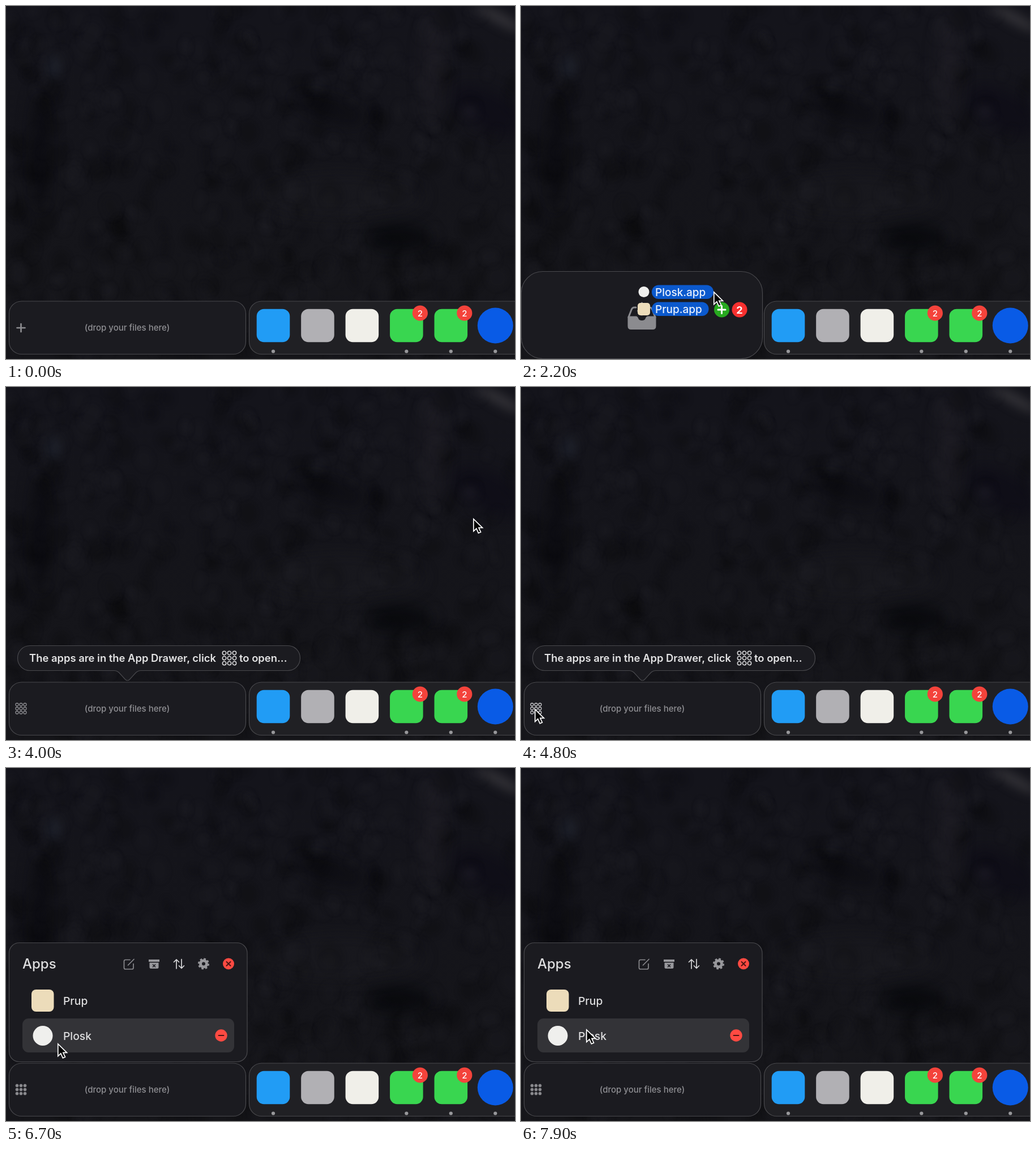
Animation, 899 px wide and 623 px high, one loop 8 s. Source, as an HTML page with a canvas:

```html
<!DOCTYPE html>
<html lang="en">
<head>
<meta charset="utf-8">
<title>App drawer</title>
<style>
  html, body { margin: 0; width: 100%; height: 100%; overflow: hidden; background: #14141a; }
  canvas, svg { position: absolute; inset: 0; width: 100%; height: 100%; display: block; }
  text { font-family: Inter, "Open Sans", sans-serif; font-weight: 500; fill: #dededf; }
  .panel { stroke: #49494d; stroke-width: 1.2; fill: #1b1b20; }
  .line { fill: none; stroke: #8b8b8f; stroke-linecap: round; stroke-linejoin: round; }
  .badge { font-size: 15px; fill: #fff; text-anchor: middle; }
  .file { font-size: 19px; fill: #e8f0fc; }
  .name { font-size: 19.3px; }
  .tip { font-size: 18.4px; font-weight: 600; fill: #e4e4e5; }
</style>
</head>
<body>
<canvas id="wall" width="899" height="623"></canvas>
<svg viewBox="0 0 899 623" preserveAspectRatio="none">
  <defs>
    <g id="dots">
      <circle cx="-7" cy="-7" r="2.5"/><circle cy="-7" r="2.5"/><circle cx="7" cy="-7" r="2.5"/>
      <circle cx="-7" r="2.5"/><circle r="2.5"/><circle cx="7" r="2.5"/>
      <circle cx="-7" cy="7" r="2.5"/><circle cy="7" r="2.5"/><circle cx="7" cy="7" r="2.5"/>
    </g>
  </defs>

  <rect class="panel" x="429.5" y="521" width="520" height="93.5" rx="22" style="fill:#202024"/>
  <g id="dock"></g>

  <rect id="shelf" class="panel"/>
  <g id="idle">
    <text x="214" y="573" text-anchor="middle" style="font-size:15px;fill:#8f8f93">(drop your files here)</text>
    <path id="plus" class="line" d="M19.5 568h14M26.5 561v14" stroke-width="2.7"/>
    <use id="grid" href="#dots" x="26.5" y="567.5"/>
  </g>

  <g id="tray" class="line" stroke-width="3">
    <path id="trayFill" d="M190 549h13q2 0 3 3.5 2 4 7.5 4t7.5-4q1-3.5 3-3.5h13v16q0 4.5-4.5 4.5h-38q-4.5 0-4.5-4.5z"/>
    <path d="M203 532h-3q-3 0-4.5 3l-5.5 14M224 532h3q3 0 4.5 3l5.5 14M213.5 524v20M206.5 538l7 7 7-7"/>
  </g>

  <g id="tooltip">
    <path class="panel" d="M42 456.5H498a21.5 22 0 0 1 0 44H238q-5 0-9 4l-11 12q-3.500 3-7 0l-11-12q-4-4-9-4H42a21.500 22 0 0 1 0-44z"/>
    <text class="tip" x="41" y="485">The apps are in the App Drawer, click</text>
    <use href="#dots" transform="translate(394.500 478.500) scale(1.28)" fill="none" stroke="#dcdcde" stroke-width="1.2"/>
    <text class="tip" x="412" y="485">to open...</text>
  </g>

  <g id="drawer">
    <rect class="panel" x="5.500" y="308.500" width="420.500" height="210" rx="18"/>
    <text x="29" y="354" style="font-size:24px">Apps</text>
    <g class="line" stroke-width="1.7">
      <path d="M219 338.500h-8q-2.500 0-2.500 2.500v11.500q0 2.500 2.500 2.500h11.500q2.500 0 2.500-2.500v-7M215.500 348l10.500-10.500"/>
      <path d="M301 354v-16M296.500 342.500l4.500-4.500 4.500 4.500M310 337.500v16M305.500 349l4.500 4.500 4.500-4.500" stroke="#d8d8da"/>
    </g>
    <path d="M252 338h19v4h-19zM253.500 343.500h16v8q0 2.500-2.500 2.500h-11q-2.500 0-2.500-2.500z" fill="#98989c"/>
    <path d="M259 346.500l5 5m0-5l-5 5" stroke="#1b1b20" stroke-width="1.6"/>
    <circle cx="349" cy="345.500" r="5.500" fill="none" stroke="#98989c" stroke-width="5"/>
    <circle cx="349" cy="345.500" r="8.800" fill="none" stroke="#98989c" stroke-width="2.500" stroke-dasharray="3.700 3.211"/>
    <circle cx="393" cy="345.500" r="10" fill="#ff4a42"/>
    <path class="line" d="M389.500 342l7 7m0-7l-7 7" style="stroke:#4a1512" stroke-width="2"/>
    <g id="hover">
      <rect x="29" y="442" width="374" height="60" rx="11" fill="#333337"/>
      <circle cx="380" cy="472" r="10.700" fill="#ff4a42"/>
      <path class="line" d="M375.500 472h9" style="stroke:#4a1512" stroke-width="2"/>
    </g>
    <rect x="45" y="391" width="39.500" height="39" rx="8" fill="#ecdcba"/>
    <circle cx="65" cy="472.500" r="17.500" fill="#efefed"/>
    <text class="name" x="101" y="418">Prup</text>
    <text class="name" x="101" y="479.500">Plosk</text>
  </g>

  <g id="pointer">
    <g id="files">
      <circle cx="-123" cy="1.500" r="9.500" fill="#efefed"/>
      <rect x="-134" y="21" width="22" height="22" rx="5" fill="#ecdcba"/>
      <rect x="-109" y="-10.500" width="109" height="24.500" rx="12" fill="#0b59cd"/>
      <rect x="-109" y="19.500" width="100.500" height="24.500" rx="12" fill="#0b59cd"/>
      <text class="file" x="-103" y="8.500">Plosk.app</text>
      <text class="file" x="-103" y="39">Prup.app</text>
      <g id="copy">
        <circle cx="14.500" cy="33" r="13.500" fill="#27a91f"/>
        <path class="line" d="M8 33h13M14.500 26.500v13" style="stroke:#fff" stroke-width="3"/>
      </g>
      <circle cx="46" cy="33" r="13.500" fill="#f8302f"/>
      <text class="badge" x="46" y="39.500" style="font-size:18px;font-weight:700">2</text>
    </g>
    <path d="M.8 2v21.500l5-4.700 3.600 8 4.100-1.800-3.600-7.700h6.600z" fill="#000" stroke="#fff" stroke-width="1.700"/>
  </g>
</svg>
<script>
const $ = id => document.getElementById(id);
const clamp = u => Math.max(0, Math.min(1, u));
const smooth = u => u * u * (3 - 2 * u);
const ramp = (t, start, end) => smooth(clamp((t - start) / (end - start)));
const mix = (a, b, u) => a + (b - a) * u;
const show = (id, opacity) => {
  $(id).style.opacity = +opacity;
  $(id).style.display = opacity > 0 ? '' : 'none';
};

// Soft, seeded mottling for the dark wallpaper
function paintWall() {
  const g = $('wall').getContext('2d');
  let seed = 7;
  const rnd = () => (seed = seed * 16807 % 2147483647) / 2147483647;
  const blob = (x, y, rx, ry, color, angle = 0) => {
    g.fillStyle = color;
    g.beginPath();
    g.ellipse(x, y, rx, ry, angle, 0, 7);
    g.fill();
  };
  const base = g.createLinearGradient(0, 0, 0, 623);
  base.addColorStop(0, '#14141b');
  base.addColorStop(1, '#151519');
  g.fillStyle = base;
  g.fillRect(0, 0, 899, 623);
  g.filter = 'blur(5px)';
  for (let i = 0; i < 520; i++) {
    const color = rnd() < .5 ? 'rgba(5,5,9,.2)' : 'rgba(38,37,45,.15)';
    blob(rnd() * 899, rnd() * 623, 5 + rnd() * 15, 7 + rnd() * 18, color, rnd() - .5);
  }
  g.filter = 'blur(14px)';
  blob(692, 408, 55, 22, 'rgba(4,5,8,.7)');
  blob(60, 260, 16, 110, 'rgba(5,5,9,.55)');
  blob(570, 180, 70, 24, 'rgba(6,6,11,.4)', .3);
  blob(850, 185, 70, 35, 'rgba(12,10,22,.6)', .5);
  blob(590, 335, 150, 40, 'rgba(40,40,45,.18)');
  blob(755, 110, 20, 100, 'rgba(48,47,53,.25)');
  g.filter = 'blur(9px)';
  blob(872, 22, 45, 10, 'rgba(75,74,77,.55)', .5);
  blob(84, 108, 12, 20, 'rgba(48,56,72,.3)');
  blob(548, 141, 10, 5, 'rgba(70,72,85,.5)');
  blob(820, 186, 10, 8, 'rgba(58,56,65,.5)');
}

function buildDock() {
  const colors = ['#219cf5', '#b1b0b4', '#f0efe9', '#39d650', '#39d650', '#095be6'];
  $('dock').innerHTML = colors.map((color, i) => {
    const x = 472 + i * 78.45, round = i === 5;
    const half = round ? 31.5 : 29.3;
    const icon = `<rect x="${x - half}" y="${564 - half}" width="${half * 2}" height="${half * 2}" rx="${round ? half : 13}" fill="${color}"/>`;
    const running = i === 1 || i === 2 ? '' : `<circle cx="${x}" cy="609.5" r="3.1" fill="#98989b"/>`;
    const badge = i === 3 || i === 4
      ? `<circle cx="${x + 24}" cy="542" r="13.6" fill="#f4433b"/><text class="badge" x="${x + 24}" y="547.5">2</text>` : '';
    return icon + running + badge;
  }).join('');
}

// Pointer stops: time, x, y
const stops = [
  [1500, 1050, 4], [1600, 921, 15], [2200, 340, 503], [2500, 340, 503],
  [3200, 846, 266], [3400, 838, 253], [3800, 825, 231], [4000, 825, 231],
  [4600, 1, 597], [4800, 24, 567], [4900, 27, 566], [5800, 27, 566],
  [6500, 80, 420], [6700, 91, 485], [6950, 91, 485],
  [7300, 105, 432], [7800, 118, 430], [7900, 115, 460]
];

function pointerAt(t) {
  const next = stops.findIndex(stop => stop[0] > t);
  if (next < 1) return (next ? stops[stops.length - 1] : stops[0]).slice(1);
  const [start, x0, y0] = stops[next - 1], [end, x1, y1] = stops[next];
  const u = ramp(t, start, end);
  return [mix(x0, x1, u), mix(y0, y1, u)];
}

function render(t) {
  const [x, y] = pointerAt(t);
  const dragging = t < 2300;
  const grow = dragging ? ramp(t, 1440, 1560) : 0;
  const over = dragging && y > 468 && x < 427;
  const stored = t >= 2600;
  const opened = ramp(t, 5850, 5980);
  const onIcon = stored && x < 40 && y > 552 && y < 585;

  const box = { x: mix(5.5, .5, grow), y: mix(521, 468.5, grow), width: mix(418, 426, grow),
                height: mix(93.5, 154, grow), rx: mix(22, 38, grow) };
  for (const key in box) $('shelf').setAttribute(key, box[key]);

  show('idle', 1 - grow);
  show('plus', !stored);
  show('grid', stored);
  const gridColor = onIcon ? '#c4c4c7' : '#8b8b8f';
  $('grid').setAttribute('fill', opened > .5 ? gridColor : 'none');
  $('grid').setAttribute('stroke', gridColor);
  $('grid').setAttribute('stroke-width', opened > .5 ? .8 : 1.3);

  show('tray', grow);
  $('trayFill').style.fill = over ? '#8b8b8f' : 'none';
  show('tooltip', ramp(t, 2560, 2680) * (1 - ramp(t, 5350, 5500)));
  show('drawer', opened);

  const row = x < 29 || x > 403 ? -1 : y >= 380 && y < 441 ? 0 : y >= 441 && y < 503 ? 1 : -1;
  show('hover', row >= 0);
  $('hover').setAttribute('transform', `translate(0 ${row === 0 ? -62 : 0})`);

  show('pointer', t >= 1500);
  show('files', dragging);
  show('copy', over);
  $('pointer').setAttribute('transform', `translate(${x} ${y})`);
}

paintWall();
buildDock();
render(0);
const began = performance.now();
requestAnimationFrame(function tick(now) {
  render(Math.max(0, now - began) % 8000);
  requestAnimationFrame(tick);
});
</script>
</body>
</html>
```
